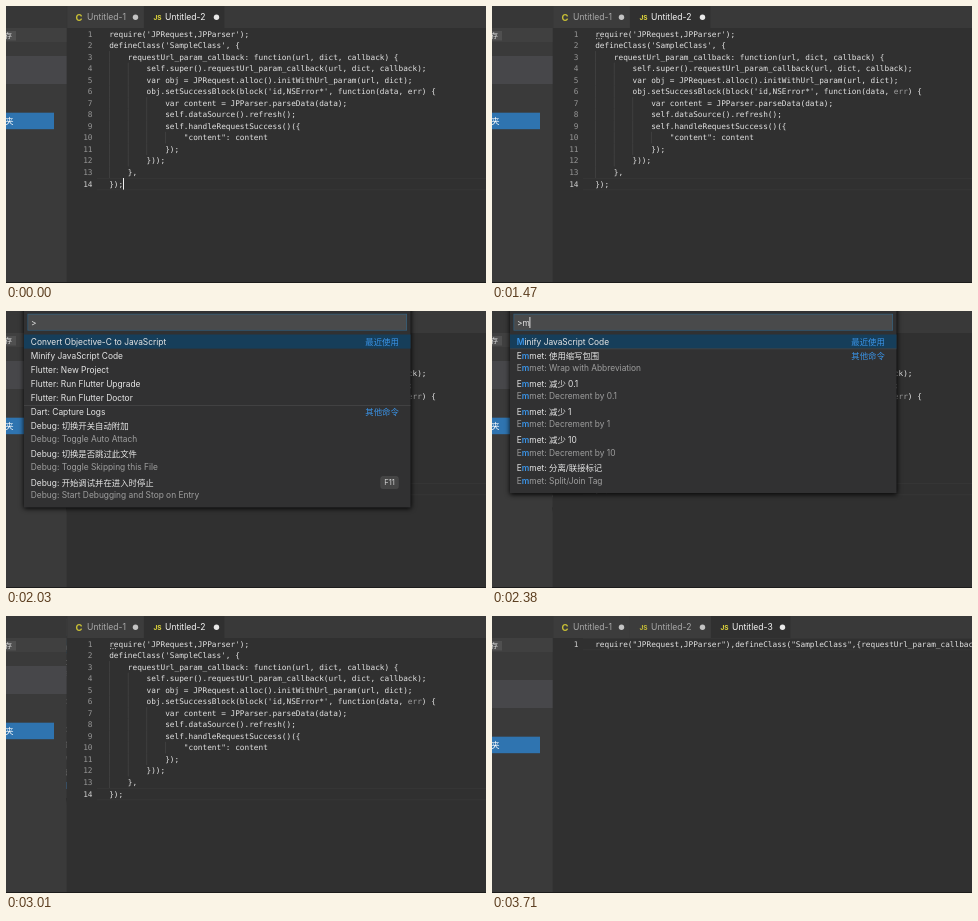
Recreate the animation shown at these times as an HTML page with a canvas. Size 480 by 277 pixels, loop 3.92 s.

```html
<!DOCTYPE html>
<html lang="zh-CN">
<head>
<meta charset="utf-8">
<style>
html, body { margin: 0; width: 100%; height: 100%; overflow: hidden; background: #303030; }
canvas { display: block; width: 480px; height: 277px; }
</style>
</head>
<body>
<canvas id="stage"></canvas>
<script>
const LOOP = 3920, LINE = 11.54, CODE_X = 103.2;
const UI = 'Inter, "Noto Sans CJK SC", "Noto Sans CJK", sans-serif';
const MONO = '7.75px "DejaVu Sans Mono", monospace';
const BLUE = '#3a94e8';

const canvas = document.getElementById('stage');
const ctx = canvas.getContext('2d');
const ratio = window.devicePixelRatio || 1;
canvas.width = 480 * ratio;
canvas.height = 277 * ratio;
ctx.scale(ratio, ratio);

// Text between bars is highlighted
const source = `require('JPRequest,JPParser');
defineClass('SampleClass', {
    requestUrl_param_callback: function(url, dict, callback) {
        self.super().requestUrl_param_callback(url, dict, callback);
        var obj = JPRequest.alloc().initWithUrl_param(url, dict);
        obj.setSuccessBlock(block('id,NSError*', function(data, |err|) {
            var content = JPParser.parseData(data);
            self.dataSource().refresh();
            self.handleRequestSuccess()({
                "content": content
            });
        }));
    },
});`.split('\n');
const minified = ['require("JPRequest,JPParser"),defineClass("SampleClass",{requestUrl_param_callback:function(url,dict,callback){'];

const RECENT = '最近使用', OTHER = '其他命令';
// Each row: title, subtitle, label on the right, shortcut keys
const commands = {
  '': [
    ['Convert Objective-C to JavaScript', '', RECENT],
    ['Minify JavaScript Code'],
    ['Flutter: New Project'],
    ['Flutter: Run Flutter Upgrade'],
    ['Flutter: Run Flutter Doctor'],
    ['Dart: Capture Logs', '', OTHER],
    ['Debug: 切换开关自动附加', 'Debug: Toggle Auto Attach'],
    ['Debug: 切换是否跳过此文件', 'Debug: Toggle Skipping this File'],
    ['Debug: 开始调试并在进入时停止', 'Debug: Start Debugging and Stop on Entry', '', ['F11']],
  ],
  m: [
    ['|M|inify JavaScript Code', '', RECENT],
    ['E|m|met: 使用缩写包围', 'E|m|met: Wrap with Abbreviation', OTHER],
    ['E|m|met: 减少 0.1', 'E|m|met: Decrement by 0.1'],
    ['E|m|met: 减少 1', 'E|m|met: Decrement by 1'],
    ['E|m|met: 减少 10', 'E|m|met: Decrement by 10'],
    ['E|m|met: 分离/联接标记', 'E|m|met: Split/Join Tag'],
  ],
  min: [
    ['|Min|ify JavaScript Code', '', RECENT],
    ['任务: 终止任务', 'Tasks: Ter|min|ate Task', OTHER],
    ['合并冲突: 全部采用传入版本', '|M|erge Conflict: Accept All |In|coming'],
    ['合并冲突: 采用传入内容', '|M|erge Conflict: Accept |In|coming'],
    ['打开新终端', 'Open New Ter|min|al', '', ['⇧', '⌘', 'C']],
    ['查看: 切换小地图', 'Toggle |Min|imap'],
  ],
};
const shorten = text => typeof text === 'string' ? text.replace(/n\|/g, '|n') : text;
commands.mi = commands.min.map(row => row.map(shorten));

function box(x, y, w, h, color) {
  ctx.fillStyle = color;
  ctx.fillRect(x, y, w, h);
}

function text(str, x, y, color, font, align = 'left') {
  ctx.font = font;
  ctx.fillStyle = color;
  ctx.textAlign = align;
  ctx.fillText(str, x, y);
  return ctx.measureText(str).width;
}

function rich(str, x, y, color, font, markColor, markFont) {
  str.split('|').forEach((part, i) => {
    x += i % 2 ? text(part, x, y, markColor, markFont) : text(part, x, y, color, font);
  });
}

function dot(x, y, r, color) {
  ctx.fillStyle = color;
  ctx.beginPath();
  ctx.arc(x, y, r, 0, 7);
  ctx.fill();
}

function drawSidebar(t) {
  const opened = t >= 3080, settled = t >= 3150;
  const shift = settled ? 14 : 0;
  box(0, 0, 60.5, 277, '#3a3a3a');
  box(0, 0, 60.5, 22, '#373737');
  box(0, 22, 60.5, 14, '#404040');
  box(0, 25, 10, 9.5, '#505050');
  text('存', -1, 32.3, '#dddddd', '7px ' + UI);
  if (opened && !settled) box(0, 64, 60.5, 14, '#4a4a4a');
  else box(0, 50 + shift, 60.5, 28, '#47474a');
  box(0, 106.7 + shift, 48, 16.5, '#2f74b0');
  text('夹', -0.8, 118.3 + shift, '#ffffff', '8.3px ' + UI);
}

function drawTabs(count) {
  box(60.5, 0, 420, 22, '#393939');
  [[62, 138], [138, 219], [219, 299]].slice(0, count).forEach(([left, right], i) => {
    const active = i === count - 1;
    box(left, 0, right - left - 0.6, 22, active ? '#303030' : '#3c3c3c');
    const icon = i ? 'JS' : 'C';
    const color = active ? '#e6dc3c' : '#c9c035';
    text(icon, i ? left + 13.5 : 73, i ? 13.8 : 14.6, color, (i ? '700 6.6px ' : '700 9.5px ') + UI, 'center');
    text('Untitled-' + (i + 1), i ? left + 21 : 81, 14.2, active ? '#f2f2f2' : '#a8a8a8', '8.6px ' + UI);
    dot(right - 8.5, 11.2, 2.7, active ? '#e8e8e8' : '#c4c4c4');
  });
}

function drawCode(lines, dimmed) {
  const current = lines.length - 1;
  const top = 22 + current * LINE;
  box(60.5, 22, 420, 255, '#303030');
  box(91, top, 389, 0.6, '#393939');
  box(91, top + LINE, 389, 0.6, '#393939');
  lines.forEach((line, i) => {
    const y = 30.5 + i * LINE;
    const indent = line.search(/\S/);
    for (let col = 0; col < indent; col += 4) {
      box(CODE_X + col * 4.666, 22 + i * LINE, 0.6, LINE, '#494949');
    }
    text(i + 1, 86.5, y, i === current ? '#d0d0d0' : '#969696', MONO, 'right');
    rich(line, CODE_X, y, '#e2e2e2', MONO, dimmed ? '#a0a0a0' : '#e2e2e2', MONO);
  });
}

function drawKeys(keys, y) {
  const wide = keys[0].length > 1;
  const step = wide ? 19 : 14;
  keys.forEach((key, i) => {
    const x = 393.3 - (keys.length - i) * step;
    ctx.beginPath();
    ctx.roundRect(x + 0.5, y - 5.7, step - 1.5, 12, 1.8);
    ctx.fillStyle = '#454545';
    ctx.fill();
    ctx.strokeStyle = '#4f4f4f';
    ctx.lineWidth = 0.6;
    ctx.stroke();
    text(key, x + step / 2 - 0.3, y + 3.1, '#d4d4d4', '7.6px Inter, "DejaVu Sans", sans-serif', 'center');
  });
}

function drawPalette(query, caret) {
  const font = '8.37px ' + UI, bold = '600 8.37px ' + UI;
  const rows = commands[query];
  const bottom = rows.reduce((y, row) => y + (row[1] ? 28.1 : 14.1), 27.5);
  ctx.save();
  ctx.shadowColor = '#000000';
  ctx.shadowBlur = 5 * ratio;
  ctx.shadowOffsetY = 1.5 * ratio;
  box(18, -8, 386.5, bottom + 8, '#313132');
  ctx.restore();

  box(21.5, 2.8, 379.5, 16.8, '#33607f');
  box(22.2, 3.5, 378.1, 15.4, '#494a4b');
  const end = 25 + text('>' + query, 25, 14.5, '#e4e4e4', font);
  if (caret) box(end - 0.4, 6, 0.9, 11, '#f0f0f0');

  let y = 23.5;
  rows.forEach(([title, sub, label, keys], i) => {
    if (!i) box(18, y, 386.5, 14.1, '#163e5a');
    else if (label) box(18, y, 386.5, 0.6, '#4c4c4d');
    rich(title, 24.8, y + 10.2, '#e6e6e6', font, BLUE, bold);
    if (sub) rich(sub, 24.8, y + 22.6, '#9e9e9e', font, BLUE, bold);
    if (label) text(label, 392.8, y + 10.2, BLUE, font, 'right');
    if (keys) drawKeys(keys, y + 7);
    y += sub ? 28.1 : 14.1;
  });
}

function draw(t) {
  const opened = t >= 3080;
  const analysed = t >= 140;
  drawCode(opened ? minified : source, analysed);
  drawTabs(opened ? 3 : 2);
  drawSidebar(t);
  if (!opened) {
    if (analysed) for (let i = 0; i < 3; i++) dot(104.6 + i * 2.4, 32.6, 0.6, '#c8c8c8');
    if (t < 140 || t >= 630 && t < 1190) box(117, 172, 1, 11.6, '#f0f0f0');
  }
  if (t >= 1540 && t < 3010) {
    const typed = [2380, 2590, 2730].filter(time => t >= time).length;
    drawPalette('min'.slice(0, typed), t < 2030 || t >= 2380);
  }
  box(0, 276, 480, 1, '#1c1c1c');
}

const start = performance.now();
function tick() {
  draw((performance.now() - start) % LOOP);
  requestAnimationFrame(tick);
}
tick();
</script>
</body>
</html>
```
